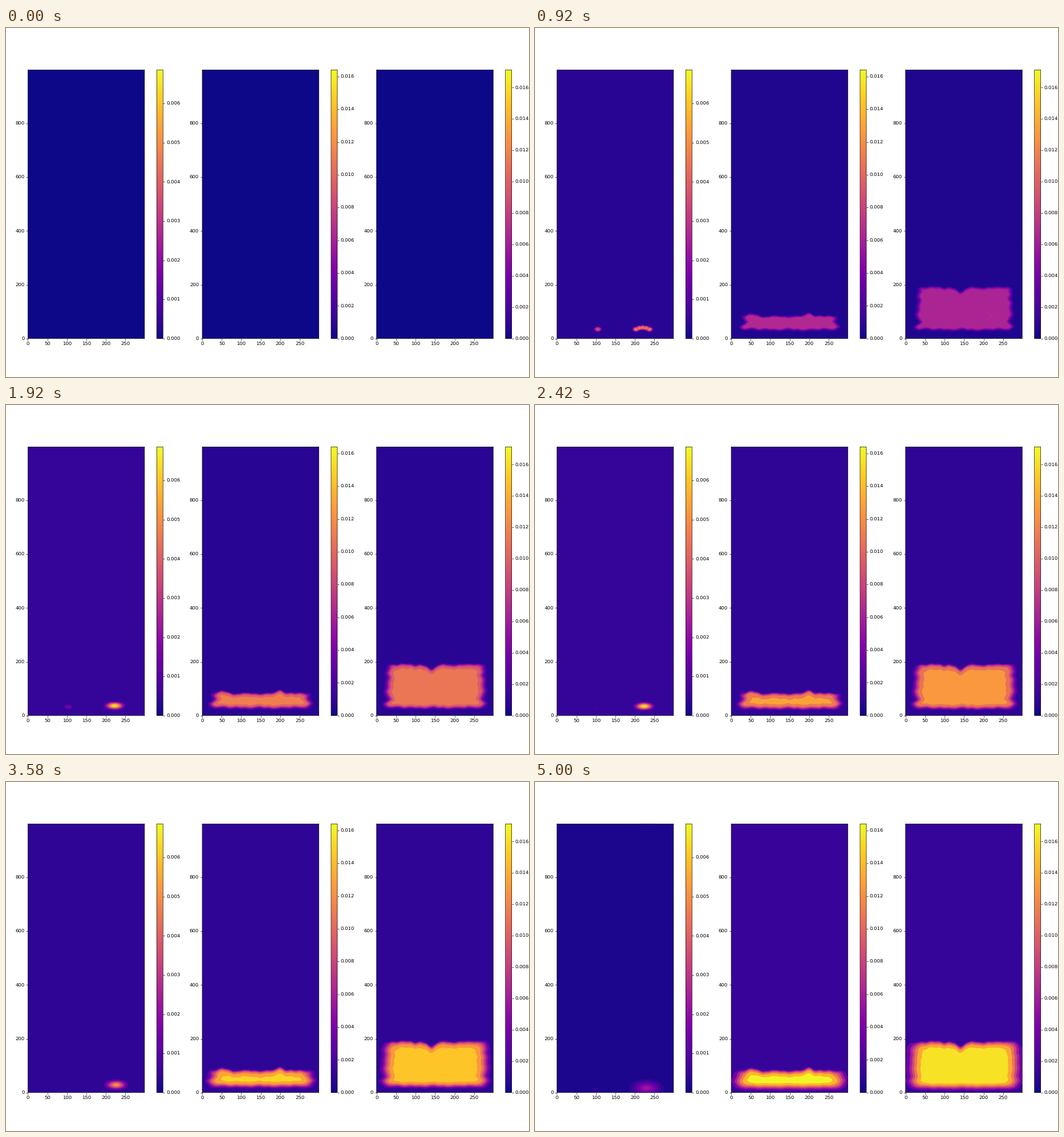
Animation of 917 by 611 pixels, one loop 5.08 s. Source, as a matplotlib script:

```python
import numpy as np
import matplotlib.pyplot as plt
from matplotlib.animation import FuncAnimation
from matplotlib.cm import ScalarMappable
from matplotlib.colors import Normalize
from matplotlib.patches import Ellipse
from matplotlib.ticker import MaxNLocator

W, H, DPI = 917, 611, 61.13
LOOP, STEP = 5080, 40          # ms
VMAX = (0.00686, 0.0164, 0.01713)

plt.rcParams.update({"font.family": "DejaVu Sans", "path.snap": False,
                     "text.hinting": "no_hinting"})
cmap = plt.get_cmap("plasma")
locator = MaxNLocator(8, min_n_ticks=1)
rng = np.random.default_rng(4)

xs = np.linspace(0, 299, 200)
ys = np.linspace(0, 220, 133)
X, Y = np.meshgrid(xs, ys)


def smooth(a, s, axis=-1):
    """Gaussian blur of s samples along one axis."""
    r = np.arange(-int(4 * s) - 1, int(4 * s) + 2)
    g = np.exp(-0.5 * (r / s) ** 2)
    g /= g.sum()
    pad = len(r) // 2

    def run(v):
        return np.convolve(np.pad(v, pad, mode="edge"), g, mode="valid")

    return np.apply_along_axis(run, axis, a)


def wobble(n, amp):
    """Seeded ragged line with a given spread."""
    v = smooth(rng.normal(size=n), 4)
    return amp * v / v.std()


def hump(a, centre, width, power=2):
    return np.exp(-np.abs((a - centre) / width) ** power)


def rise(d, w):
    return 1 / (1 + np.exp(-d / w))


grain = smooth(smooth(rng.normal(size=X.shape), 2.4, 1), 2, 0)
grain /= grain.std()
patches = (hump(X, 87, 29, 4) + hump(X, 222, 27, 4)) * hump(Y, 113, 58, 6)

# Ragged borders shared by both blocks; only the tops differ.
low = wobble(xs.size, 2.2)
left = wobble(ys.size, 2.5) - 6 * hump(ys, 43, 10) + 5 * hump(ys, 66, 10)
right = wobble(ys.size, 2.5) + 7 * hump(ys, 45, 9) - 8 * hump(ys, 64, 8)
thin_top = (85 + wobble(xs.size, 1.5) + 6 * hump(xs, 53, 14)
            - 5 * hump(xs, 78, 9) + 10 * hump(xs, 200, 11))
tall_top = 191 + wobble(xs.size, 2) - 14 * hump(xs, 142, 11)


def slab(k, top, fade, gain, half, texture):
    """Filled block that saturates, spreads sideways and sinks."""
    calm = 1 - .014 * k
    side, base = 1.5 + .165 * k, 1.8 + .1 * k
    west = 35 - .32 * k + calm * left[:, None]
    east = 267 + .32 * k + calm * right[:, None]
    south = 35 - .31 * k + calm * low
    w = 1.5 + .01 * k
    depth = np.logaddexp(0, (top - Y) / w) * w
    u = rise(X - west, side) * rise(east - X, side) * rise(Y - south, base)
    u = u * (1 - np.exp(-depth / fade))
    return gain * k / (k + half) * u / u.max() * (1 + texture)


def thin(k):
    return slab(k, thin_top, 1.5 + .19 * k, .0236, 22, .003 * grain)


def tall(k):
    return slab(k, tall_top, 3 + .18 * k, .02497, 24,
                .006 * grain + .013 * patches)


def blob(cx, cy, sx, sy):
    return np.exp(-.5 * (((X - cx) / sx) ** 2 + ((Y - cy) / sy) ** 2))


def disc(cx, cy, r):
    return np.exp(-(np.hypot(X - cx, Y - cy) / r) ** 3)


chain = np.max([disc(x, 41 - .022 * (x - 220) ** 2, 8.5)
                for x in np.linspace(203, 237, 5)], axis=0)
spot = disc(105, 35, 9)


def spots(k):
    """Two small sources that merge, sink and fade."""
    mix = np.clip((k - 9) / 5, 0, 1)
    late = .4 * max(k - 30, 0)
    main = blob(217.5 + .25 * k, 40 - .0092 * k ** 2, 14 + late, 8.5 + late)
    side = blob(105.5 - .11 * k, 36 - .009 * k ** 2, 9 + .09 * k, 9)
    big = np.interp(k, [0, 9, 14, 20, 30, 42, 50],
                    [0, .0046, .0063, .00686, .0065, .0031, .0023])
    small = min(.0004 * k, .088 * max(k, 1) ** -1.4)
    return (big * ((1 - mix) * chain + mix * main)
            + small * ((1 - mix) * spot + mix * side))


fig = plt.figure(figsize=(W / DPI, H / DPI), dpi=DPI, facecolor="white")
axes = []
for i, vmax in enumerate(VMAX):
    x0 = 38.4 + W / 3 * i
    ax = fig.add_axes([x0 / W, .11, 204.5 / W, .77])
    ax.set(xlim=(0, 299), ylim=(0, 999), xticks=range(0, 300, 50),
           yticks=range(0, 1000, 200))
    ax.autoscale(False)
    cax = fig.add_axes([(x0 + 225.9) / W, .11, 11 / W, .77])
    fig.colorbar(ScalarMappable(Normalize(0, vmax), cmap), cax=cax)
    axes.append(ax)

wrap = axes[0].add_patch(Ellipse((235, 999), 45, 8, lw=0, visible=False))
shown = {"k": None, "layers": []}


def paint(ax, u, vmax):
    """Stack filled contours with automatically chosen levels."""
    peak = u.max()
    if peak <= 0:
        ax.set_facecolor(cmap(0.0))
        return
    levels = locator.tick_values(0, peak)
    mid = (levels[1] - levels[0]) / 2
    ax.set_facecolor(cmap(mid / vmax))
    for lev in levels[1:]:
        if lev < peak:
            shown["layers"].append(ax.contourf(
                xs, ys, u, levels=[lev, 1], antialiased=True,
                colors=[cmap((lev + mid) / vmax)]))


def update(n):
    k = int((n * STEP + 20.8) / 100)
    if k == shown["k"]:
        return []
    for layer in shown["layers"]:
        layer.remove()
    shown.update(k=k, layers=[])
    for ax, field, vmax in zip(axes, (spots, thin, tall), VMAX):
        paint(ax, field(k), vmax)
    wrap.set(visible=k >= 46, facecolor=cmap(.00045 / VMAX[0]))
    return []


anim = FuncAnimation(fig, update, frames=LOOP // STEP, interval=STEP,
                     repeat=True, repeat_delay=0, blit=False)
plt.show()
```
